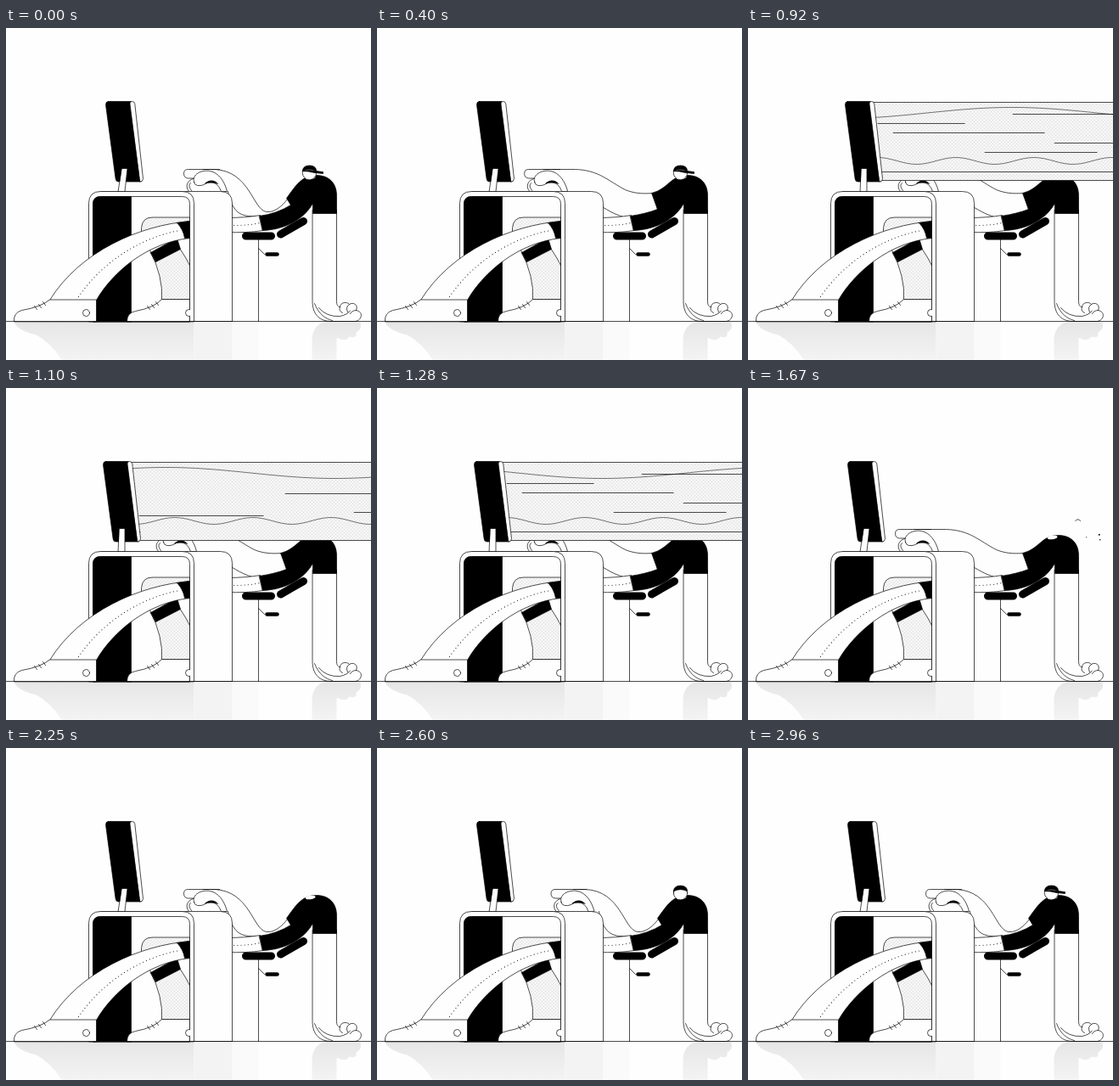
Animation of 430 by 391 pixels, one loop 2.99 s. Source, as an HTML page:

```html
<!DOCTYPE html>
<html>
<head>
<meta charset="utf-8">
<title>Desk</title>
<style>
html, body { margin: 0; width: 100%; height: 100%; overflow: hidden; background: #fefefe; }
svg { display: block; width: 430px; height: 391px; stroke: #000; stroke-width: .7; fill: #fefefe; stroke-linecap: round; stroke-linejoin: round; }
.ink { fill: #000; }
.line { fill: none; }
.thin { stroke-width: .55; }
.dots { fill: url(#dots); }
.flat { stroke: none; }
.stitch { fill: none; stroke-width: 1.1; stroke-dasharray: 0 4.2; }
</style>
</head>
<body>
<!-- The half-pixel origin keeps straight lines crisp. -->
<svg viewBox="0.5 0.5 430 391">
  <defs>
    <pattern id="dots" width="4" height="4" patternUnits="userSpaceOnUse">
      <rect class="flat" width="4" height="4"/>
      <path class="flat" style="fill:#999" d="M.5 .5h1v1h-1zM2.5 2.5h1v1h-1z"/>
    </pattern>
    <linearGradient id="fade" x2="0" y2="1">
      <stop stop-color="#e6e6e6"/><stop offset="1" stop-color="#f3f3f3"/>
    </linearGradient>
    <clipPath id="neck"><path d="M330 120H400V176H365Q359 181.500 353 177H330Z"/></clipPath>
    <clipPath id="beamClip"><polygon id="beamEdge"/></clipPath>
  </defs>

  <!-- floor reflection -->
  <g class="flat">
    <path style="fill:url(#fade)" d="M10 346Q12 356 36 362Q52 370 66 391H222V346Z"/>
    <path style="fill:#f3f3f3" d="M222 346H267V391H222Z"/>
    <path style="fill:#fafafa" d="M267 346H298V391H267Z"/>
    <path style="fill:url(#fade)" d="M361 391V366Q363 348 380 346H417Q422 354 413 359Q414 367 405 364Q400 371 390 365V391Z"/>
  </g>

  <!-- chair base -->
  <path class="line" d="M298 250V346M298 260L305 267"/>
  <path class="line" stroke-width="4.500" style="stroke-width:4.500" d="M308 267H320"/>

  <!-- hanging arm -->
  <path d="M361.500 215V322C361.500 338 370 346 384 346H411C419 346 423 335 413 333C416 326 409 323 405 326C402 322 394 324 394 329C391 329 390 326 390 322V215Z"/>
  <path class="line" d="M364 325C369 338 377 343 385 345M369 330Q378 341 394 340Q403 338 406 333.500M394 329Q392 334 397 336M405 326Q400 329 403 335M413 333Q408 333 406 337"/>

  <path id="arm"/>
  <g id="hand">
    <path class="flat" d="M248 168H215Q210 168 210 172T215 177H221C213 181 212 188 217 193H258V180Z"/>
    <path class="line" d="M252 167H215Q210 167 210 172T215 177.500H222M221 178C214 180 211 187 216 193M218 183Q214 186 219 192"/>
    <path d="M222 182C219 173 231 167 241 169C251 171 258 181 261 193H254Q251 183 240 181Q233 187 226 186Q222 185 222 182Z"/>
    <path class="ink flat" d="M234 184Q243 176 251 184.500Q243 182 234 184Z"/>
  </g>

  <!-- hips and seat -->
  <path d="M260 224Q283 224 300 221L303 239Q285 242 260 241Z"/>
  <path class="stitch" d="M269 233Q286 233 300 230"/>
  <path class="line" style="stroke-width:9" d="M283 245.500H313M324 243.500L351 228"/>
  <path id="shirt" class="ink"/>
  <ellipse class="flat" cx="359" cy="176.500" rx="6" ry="2.200" transform="rotate(-8 359 176)"/>

  <g clip-path="url(#neck)">
    <g id="head">
      <circle cx="358" cy="171" r="8.200"/>
      <path class="ink" d="M350 169Q350 162.500 358 162.500T366 169Q358 165 350 169Z"/>
      <path id="brim" class="ink" d="M350 169Q358 167 366 169L374 170V172L364 171Q357 169 350 169Z"/>
    </g>
  </g>
  <g id="bits"></g>

  <!-- desk -->
  <path d="M112 193H253Q267 193 267 207V346H112Z"/>
  <path d="M98 346V207Q98 193 112 193H208Q222 193 222 207V346Z"/>
  <path d="M103 346V208Q103 199 112 199H208Q217 199 217 208V346Z"/>
  <path class="ink" d="M103 346V208Q103 199 112 199H148V346Z"/>

  <!-- chair back and far leg -->
  <path class="dots" d="M160 260V236Q161 223.500 173 223.500H217V320H160Z"/>
  <path class="flat" d="M148.500 258L172 262Q186 294 184 321H148.500Z"/>
  <path class="line" d="M170 262Q186 294 184 320"/>
  <path d="M196 250Q207 260 217 280V246Z"/>
  <path class="ink" d="M171 265L202 248L206 261L177 276Z"/>
  <path d="M143 346Q143 336 153 334Q175 330 184 320H217V346Z"/>
  <path class="line" d="M167 328l3 4M172 326l3 4M177 323l3 4"/>
  <circle cx="216" cy="336" r="4"/>

  <!-- near leg -->
  <path d="M217 228C158 233 88 263 52 321H107C126 288 167 253 217 248Z"/>
  <path class="ink" d="M202 230L217 228V248L211 248Q209 237 202 230Z"/>
  <path class="stitch" d="M86 317C112 279 154 249 204 239"/>
  <path d="M10 346Q9 336 19 333Q42 329 52 320.500H107V346Z"/>
  <path class="line" d="M34 328l3 4M39 326l3 4M44 323l3 4"/>
  <circle cx="95" cy="336" r="4"/>
  <path class="flat" d="M217.500 208H221.500V345H217.500Z"/>
  <path class="line" d="M0 346H431"/>

  <!-- beam -->
  <g id="beam" clip-path="url(#beamClip)">
    <rect class="dots" x="100" y="88" width="400" height="92"/>
    <path id="waves" class="line thin"/>
    <path id="streaks" class="line"/>
  </g>

  <g id="screen">
    <path class="ink" d="M121 87H148L160 181.500H133Q130 181.500 129.600 178L118 91Q118 87 121 87Z"/>
    <path d="M146.500 90Q146 87 149 87Q152 87 152.300 90L162 178Q162 181.500 158.500 181.500Z"/>
  </g>
  <path id="stand"/>
</svg>
<script>
const LOOP = 2990;
const $ = id => document.getElementById(id);
const clamp = v => Math.min(1, Math.max(0, v));
const set = (id, name, value) => $(id).setAttribute(name, value);
const shift = (id, x, y = 0) => set(id, 'transform', `translate(${x} ${y})`);
const show = (id, on) => $(id).style.display = on ? '' : 'none';

// Blend two paths that share the same commands.
function mix(a, b, k) {
  const ends = b.match(/[\d.]+/g);
  let i = 0;
  return a.replace(/[\d.]+/g, n => +n + (ends[i++] - n) * k);
}

const ARM = [
  'M262 193C268 222 280 223 299 222C315 222 330 216 336 209L333 201C325 211 317 218 307 217C291 214 288 169 246 167L232 167',
  'M255 204C270 214 282 222 299 225C315 222 325 218 331 214L325 195C313 196 303 195 293 191C272 180 262 168 234 167L196 167'
];
const SHIRT = [
  'M299 222Q320 219 336 209L331 201C342 186 349 174 366 174C382 174 390 184 390 198L390 219L362 219L362 207C352 225 330 238 303 239Z',
  'M299 222Q318 219 331 214L324 195C344 190 346 174 366 174C382 174 390 184 390 198L390 219L362 219L362 207C352 225 330 238 303 239Z'
];

// Streaks in the beam: y, x, length; they repeat every 600 px.
const STREAKS = [
  [102, 311, 130], [113, 152, 102], [124, 170, 178], [136, 360, 90], [147, 278, 132],
  [125, 28, 110], [151, -144, 146], [147, 109, 40], [170, 157, 300]
];

// Flying bits: velocity x, velocity y, size.
const BITS = [[54, -30, 1], [55, -24, .8], [39, -27, .6]];

function wave(mid, amp, length, crest) {
  let d = '';
  for (let x = 140; x <= 440; x += 6)
    d += `${d ? 'L' : 'M'}${x} ${mid - amp * Math.cos((x - crest) / length * 2 * Math.PI)}`;
  return d;
}

function drawBeam(t) {
  const on = t >= 650 && t < 1560;
  show('beam', on);
  if (!on) return;
  const left = 147 + 300 * clamp((t - 1440) / 120) ** 2;
  const right = 150 + 300 * clamp((t - 640) / 100);
  set('beamEdge', 'points', `${left},86 ${right},86 ${right + 10},181 ${left + 10},181`);
  const s = t - 920, run = s / 360 * 600;
  set('waves', 'd', wave(100.5, 6.5, 400, 310 + s * 1.539) + wave(157, 4, 92, 244 + s * 1.278));
  let d = '';
  for (const [y, x, w] of STREAKS) {
    const from = ((x + run + 300) % 600 + 600) % 600 - 300;
    for (const at of [from, from + 600]) d += `M${at} ${y}h${w}`;
  }
  set('streaks', 'd', d);
}

function drawBits(t) {
  const s = (t - 1480) / 190, size = clamp((1800 - t) / 130);
  const on = s > 0 && size > 0;
  show('bits', on);
  if (!on) return;
  const at = (vx, vy) => [360 + vx * s, 168 + vy * s + 35 * s * s];
  const [cx, cy] = at(29, -47);
  $('bits').innerHTML = `<path class="line" d="M${cx - 3} ${cy + 1}q3 -4 ${6 * size} 0"/>` +
    BITS.map(([vx, vy, r]) => {
      const [x, y] = at(vx, vy);
      return `<circle class="ink flat" cx="${x}" cy="${y}" r="${r * size}"/>`;
    }).join('');
}

function drawHead(t) {
  show('head', t < 900 || t > 2250);
  const p = clamp((t - 2250) / 500);
  const up = t < 900 ? 0 : 20 * Math.exp(-5 * p) * Math.cos(p * 7.85) * (1 - p);
  const wobble = t > 2780 ? Math.sin(clamp((t - 2780) / 180) * Math.PI) : 0;
  shift('head', 0, up - 3 * wobble);
  const brim = t < 900 ? 1 : clamp((t - 2600) / 120);
  set('brim', 'transform', `translate(350 0) scale(${brim} 1) translate(-350 0) rotate(${-14 * wobble} 358 169)`);
}

function draw(t) {
  const ease = (a, b) => { const p = clamp((t - a) / (b - a)); return p * p * (3 - 2 * p); };
  const reach = ease(180, 410) - ease(1710, 2040);
  const tap = Math.sin(clamp((t - 2250) / 480) * Math.PI) ** 2;
  set('arm', 'd', mix(...ARM, reach));
  set('shirt', 'd', mix(...SHIRT, reach));
  shift('hand', -36 * reach - 8 * tap);

  const kick = -3 * (ease(640, 700) - ease(1480, 1600));
  shift('screen', kick);
  set('stand', 'd', `M${137 + kick} 166H${143.5 + kick}L140.500 193H133Z`);
  drawBeam(t);
  drawBits(t);
  drawHead(t);
}

const start = performance.now();
function frame() {
  draw((performance.now() - start) % LOOP);
  requestAnimationFrame(frame);
}
frame();
</script>
</body>
</html>
```
